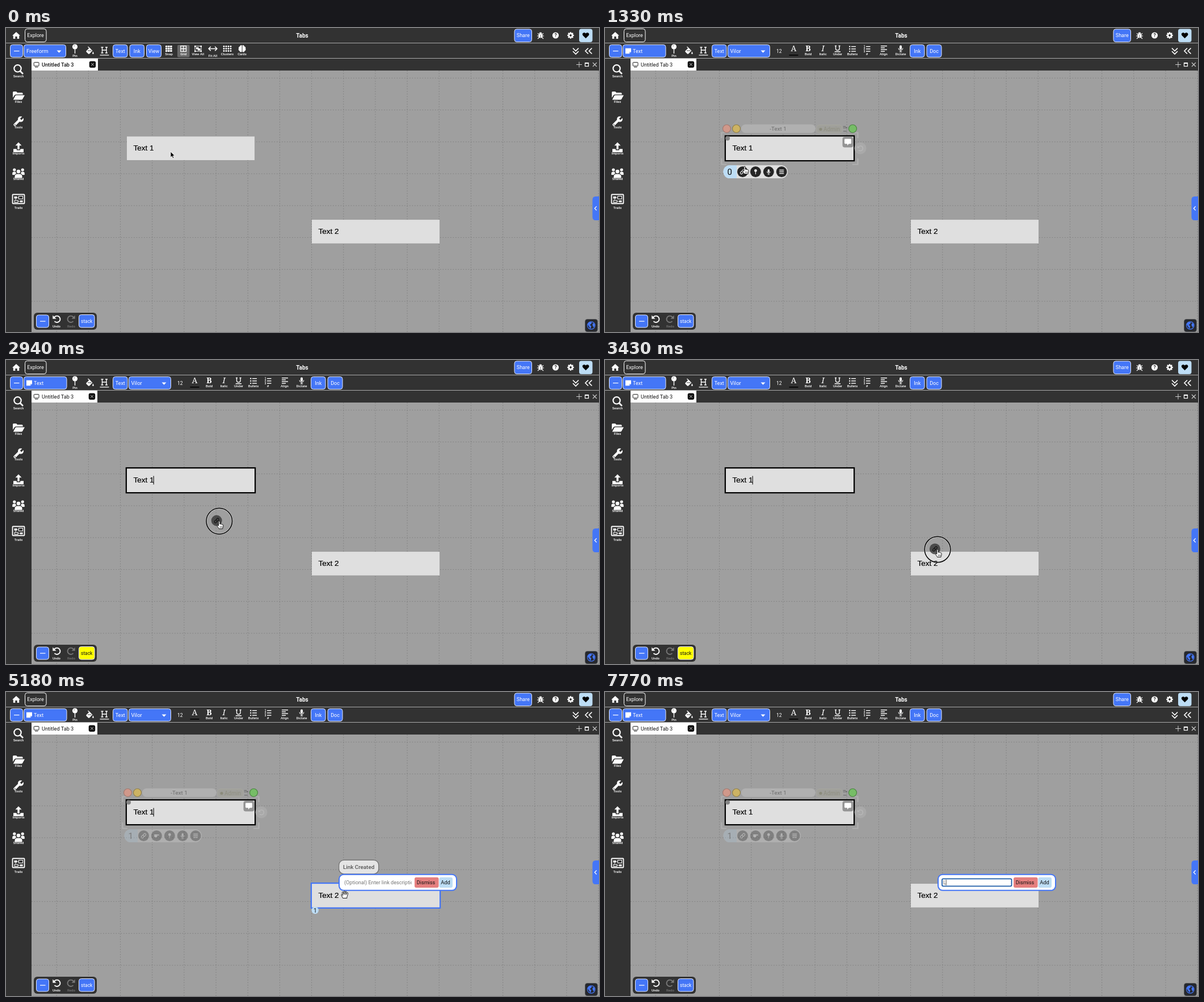
An HTML page for the animation above (8000 ms loop, 1045 px wide and 536 px high).

```html
<!DOCTYPE html>
<html lang="en">
<head>
<meta charset="utf-8">
<title>Tabs</title>
<style>
html, body { margin: 0; width: 100%; height: 100%; overflow: hidden; background: #323232; }
svg { display: block; width: 100%; height: 100%; font-family: Roboto, sans-serif; }
.doc { font-family: "Liberation Sans", sans-serif; stroke: #000; stroke-width: .2; }
</style>
</head>
<body>
<svg id="stage" viewBox="0 0 1045 536"></svg>
<script>
const BLUE = '#4476f7', PALE = '#bdddf5', DARK = '#323232', MID = '#9f9f9f', LIGHT = '#dfdfdf';
const LOOP = 8000, STEP = 70;

// Markup helpers; text y is the middle of the line
const rect = (x, y, w, h, fill, r = 0, more = '') =>
  `<rect x="${x}" y="${y}" width="${w}" height="${h}" rx="${r}" fill="${fill}" ${more}/>`;
const circle = (x, y, r, fill, more = '') => `<circle cx="${x}" cy="${y}" r="${r}" fill="${fill}" ${more}/>`;
const fillPath = (d, fill = '#fff', more = '') => `<path d="${d}" fill="${fill}" ${more}/>`;
const line = (d, color = '#fff', w = 1.5, more = '') =>
  `<path d="${d}" fill="none" stroke="${color}" stroke-width="${w}" ${more}/>`;
const text = (x, y, s, size, fill = '#fff', more = '') =>
  `<text x="${x}" y="${y + size * 0.355}" font-size="${size}" fill="${fill}" ${more}>${s}</text>`;
const MIDDLE = 'text-anchor="middle"', ROUND = 'stroke-linecap="round" stroke-linejoin="round"';
const mid = (x, y, s, size, fill, weight = 400) => text(x, y, s, size, fill, `${MIDDLE} font-weight="${weight}"`);
const label = (x, y, s, fill = '#fff') => mid(x, y, s, 6, fill, 500);
const group = (id, body, more = '') => `<g id="${id}" ${more}>${body}</g>`;
const move = (x, y, body, scale = 1) => `<g transform="translate(${x} ${y}) scale(${scale})">${body}</g>`;
const button = (x, y, w, h, s = '', size = 9) =>
  rect(x + .5, y + .5, w - 1, h - 1, BLUE, 4, 'stroke="#e4e9fb"') + (s && mid(x + w / 2, y + h / 2, s, size));
const minus = (x, y) => button(x, y, 23, 23) + rect(x + 7, y + 11, 9.5, 1.2, '#fff');
const range = (n, f) => Array.from({ length: n }, (_, i) => f(i)).join('');

// Small glyphs centred on the origin
const linkGlyph = color => `<g transform="rotate(-45)">` +
  line('M-.3 1.9H-3A1.9 1.9 0 0 1-3-1.9H-1.2A1.9 1.9 0 0 1 .6 0M.3-1.9H3A1.9 1.9 0 0 1 3 1.9H1.2A1.9 1.9 0 0 1-.6 0', color, 1.1) + '</g>';
const pinGlyph = color => circle(0, -2, 2.4, color) + line('M0 0V4.6', color, 1.1);
const micGlyph = color => rect(-1.6, -4.6, 3.2, 6, color, 1.6) +
  line('M-3-.5A3 3 0 0 0 3-.5M0 2.5V4.5M-1.8 4.6H1.8', color, .9);
const barsGlyph = color => line('M-4-3H4M-4 0H4M-4 3H4', color, 1.3);
const pointGlyph = color => rect(-4.5, -2.2, 9, 1.8, color, .9) + rect(-4, -2.2, 5, 5, color, 1.2);
const undoGlyph = color => line('M-5.3-1.2A5.7 5.7 0 1 1-4 4.2', color, 1.9) + fillPath('M-7.2-6.5V-.2H-1Z', color);

function chrome() {
  const side = [['Search', 85], ['Files', 129.5], ['Tools', 174.5], ['Imports', 220.5], ['Shared', 265.5], ['Trails', 317]];
  return rect(0, 0, 1045, 536, DARK) +
    rect(0, 26, 1045, 1, '#aaa') + rect(0, 53, 1045, 1, '#aaa') +
    fillPath('M11 13.6 18 7l7 6.6h-1.8V19h-3.5v-4h-3.4v4h-3.5v-5.4z') +
    rect(33.5, 1.5, 37.5, 23, 'none', 4, 'stroke="#fff"') + mid(52, 13, 'Explore', 9) +
    mid(522, 13, 'Tabs', 10, '#fff', 700) + button(895.5, 1.5, 31.5, 23.5, 'Share') +
    circle(942, 14, 3.6, '#fff') + circle(942, 9.8, 2.3, '#fff') +
    line('M936 14H948M937 9.5 940 12M947 9.5 944 12M937 19 940 16M947 19 944 16', '#fff', 1.1) + line('M942 12V18', DARK, .7) +
    circle(968.5, 13, 5.6, '#fff') + mid(968.5, 13.2, '?', 8.5, DARK, 700) +
    circle(995, 13, 3.2, 'none', 'stroke="#fff" stroke-width="2.6"') +
    range(8, i => `<rect x="993.8" y="7.2" width="2.4" height="3" fill="#fff" transform="rotate(${i * 45} 995 13)"/>`) +
    rect(1010, 1.5, 23.5, 23.5, PALE, 4) +
    fillPath('M1021.7 18.2 1016.9 13.4C1013.7 9.7 1018.8 6 1021.7 9.7 1024.6 6 1029.7 9.7 1026.5 13.4Z', '#000') +
    line('M999 35.5 1004 40.5 1009 35.5M999 41 1004 46 1009 41M1026 35.5 1021 40.5 1026 45.5M1032.5 35.5 1027.5 40.5 1032.5 45.5', '#fff', 1.7) +
    line('M1005 64.5H1015M1010 59.5V69.5', '#ccc', 1) + line('M1034 61 1041 68M1041 61 1034 68', '#ccc', 1.1) +
    rect(1020.5, 61.5, 6, 6, 'none', 0, 'stroke="#fff" stroke-width="1.2"') + rect(1020, 61, 7, 2, '#fff') +
    side.map(([s, y]) => label(22, y, s)).join('') +
    circle(20.5, 71.3, 6.2, 'none', 'stroke="#fff" stroke-width="2.2"') + line('M25 76 30 81', '#fff', 2.6) +
    fillPath('M12 123V113.5Q12 112 13.5 112H18l2 2h8q1.6 0 1.6 2v1.2H17.5q-2 0-3 2ZM12.8 126.5 16.3 119.8q.6-1.2 2-1.2H33L29.2 125.2q-.7 1.3-2 1.3Z') +
    line('M15.5 170.5 23.5 162.5', '#fff', 4.4, ROUND) + circle(26, 160.8, 5, '#fff') +
    line('M26 161 31 156', DARK, 3.4) + circle(15.8, 170.3, .9, DARK) +
    fillPath('M22 201.5 27.5 207.3H23.7V214H20.3V207.3H16.5Z') +
    fillPath('M13 213.3H18.8V215.5H25.2V213.3H31V219H13Z') +
    circle(22, 253, 3.3, '#fff') + circle(14.8, 250, 2.6, '#fff') + circle(29.2, 250, 2.6, '#fff') +
    fillPath('M15.5 264.5V262Q15.5 257.5 20 257.5H24Q28.5 257.5 28.5 262V264.5ZM11.3 258V256Q11.3 253.4 14 253.4H16.8Q17.6 256 18.4 256.6 16 257 15.4 259H11.3ZM32.7 258V256Q32.7 253.4 30 253.4H27.2Q26.4 256 25.6 256.6 28 257 28.6 259H32.7Z') +
    rect(11.5, 293.5, 21, 16, 'none', 1, 'stroke="#fff" stroke-width="1.8"') +
    rect(14.5, 297, 5, 3.6, '#fff') + rect(22.5, 296.5, 7, 5, 'none', 0, 'stroke="#fff"') +
    rect(15, 304, 6, 3.4, 'none', 0, 'stroke="#fff"') + rect(25, 304, 4.5, 3.2, '#fff') +
    line('M19 299H23M17 300V304M21 305.5H25', '#fff', .8);
}

function tools() {
  const heading = line('M169.5 34V44M177 34V44M169.5 39H177M167.5 34H171.5M175 34H179M167.5 44H171.5M175 44H179', '#fff', 1.4);
  const shared = minus(7, 29) + circle(121.5, 33, 4.6, '#fff') + circle(120.3, 31.6, 1, '#999') + line('M121.5 37V45', '#fff', 1.4) +
    label(121.5, 49, 'Pin') +
    fillPath('M142 40 147.2 34.8 152.4 40 147 45.5Q146 46.3 145 45.5L141.5 42Q140.8 41 142 40ZM153.4 41.5Q156 46 153.4 46 151 46 153.4 41.5Z') +
    line('M144.5 33 149 37.5', '#fff', 1.2) + line('M144 40H150.6', DARK, 1) +
    heading + rect(165.5, 47, 16, 1.5, '#ddd');
  const freeform = button(31, 29, 75, 23) + text(36, 41, 'Freeform', 9.5) + fillPath('M89.5 39.5H97.5L93.5 43.7Z') +
    button(188, 29, 26.5, 23, 'Text') + button(217.5, 29, 26.5, 23, 'Ink') + button(247, 29, 27, 23, 'View') +
    range(9, i => rect(281 + i % 3 * 4.1, 31 + Math.floor(i / 3) * 3.9, 3.4, 3.2, '#fff', .4)) + label(287, 46, 'Snap') +
    rect(302, 30, 21.5, 21.5, '#686868', 2) +
    line('M307.8 31.7H317.5V41.3H307.8ZM312.6 31.7V41.3M307.8 36.5H317.5', '#fff', 1.3) + label(312.7, 46, 'Grid') +
    rect(333, 32, 11, 9, 'none', 0, 'stroke="#fff"') + rect(335, 34, 4.5, 3.6, '#fff') + rect(338, 36, 4.5, 3.6, '#fff') +
    [332, 342.5].map(x => rect(x, 31, 2.5, 2.5, '#fff') + rect(x, 39.7, 2.5, 2.5, '#fff')).join('') + label(338.3, 46, 'View All') +
    line('M358 36.5H371M360.8 32.8 357.2 36.5 360.8 40.2M368.2 32.8 371.8 36.5 368.2 40.2', '#fff', 1.6) + label(364.5, 48.5, 'Fit All') +
    range(12, i => circle(384 + i % 4 * 4, 32.5 + Math.floor(i / 4) * 4, 1.45, '#fff')) + label(390, 46, 'Clusters') +
    fillPath('M415.6 30.5V42Q412.5 43.5 411.6 40.5 409 39.5 410 36 409.5 33 412 32.5 413 29.7 415.6 30.5ZM416.6 30.5V42Q419.7 43.5 420.6 40.5 423.2 39.5 422.2 36 422.7 33 420.2 32.5 419.2 29.7 416.6 30.5Z') +
    label(416, 46, 'Cards');
  const rows = (x, w) => [32, 36.2, 40.4].map(y => rect(x, y, w, 1.4, '#fff')).join('');
  const glyph = (x, s, more) => text(x, 36.3, s, 14, '#fff', `${MIDDLE} font-family="Noto Serif, serif" ${more}`);
  const writing = button(31, 29, 76.5, 23) + fillPath('M36 35.7H46V42L42.7 45.3H36Z') + fillPath('M46 42H42.7V45.3Z', '#a9bdf8') +
    text(49, 40.5, 'Text', 9) + button(188, 29, 26.5, 23, 'Text') +
    button(216, 29, 75, 23) + text(220.5, 41, 'Vilor', 9.5) + fillPath('M274.5 39.5H282.5L278.5 43.7Z') +
    mid(306.7, 40.5, '12', 8.5) + glyph(332.5, 'A', '') + rect(324.5, 47, 16, 1.6, '#000') +
    glyph(358, 'B', 'font-weight="700"') + label(358, 46, 'Bold') + glyph(384, 'I', 'font-style="italic"') + label(384, 46, 'Italic') +
    line('M406.5 31.5V36A3.3 3.3 0 0 0 413.1 36V31.5M405 31.5H408M411.6 31.5H414.6M404.7 41.8H415', '#fff', 1.4) + label(410, 46, 'Under') +
    [32.7, 36.9, 41.1].map(y => circle(431.2, y, 1.2, '#fff')).join('') + rows(434, 8) + label(436, 46, 'Bullets') +
    ['1', '2', '3'].map((s, i) => mid(457, 32.7 + i * 4.2, s, 4.5, '#fff', 700)).join('') + rows(460, 7.5) + label(461.5, 46, '#') +
    [11, 7, 11, 7].map((w, i) => rect(486, 31 + i * 3.2, w, 1.4, '#fff')).join('') + label(491, 46, 'Align') +
    move(521, 36.2, micGlyph('#fff'), 1.25) + label(521, 46, 'Dictate') +
    button(537, 29, 26.5, 23, 'Ink') + button(566.5, 29, 27, 23, 'Doc');
  return shared + group('freeform', freeform) + group('writing', writing);
}

// A text card is 200 by 37 units at a zoom of 1.125, its outline 2 units wide
const card = (x, y, s) => rect(x, y, 225, 41.7, LIGHT) + text(x + 11.4, y + 20.2, s, 13.6, '#000', 'class="doc"');
const outline = (x, y, color, id) =>
  rect(x - 1.1, y - 1.1, 227.2, 43.9, 'none', 0, `id="${id}" stroke="${color}" stroke-width="2.25"`);

function canvas() {
  const dash = 'stroke-dasharray="1.7 2.8"';
  const tab = (id, w, weight) => group(id, rect(45, 54, w, 21, '#fff') +
    text(63, 64.3, 'Untitled Tab 3', 9.2, '#111', `font-weight="${weight}"`) +
    rect(w + 29.7, 58.5, 11.5, 11.5, '#111', 3) + line(`M${w + 33.2} 62l4.6 4.6m0-4.6-4.6 4.6`, '#ddd', .9));
  return rect(45, 75, 1000, 461, MID) + tab('tabBold', 117, 500) + tab('tabPlain', 116, 400) +
    rect(49.2, 60.5, 8.8, 6.5, 'none', 1, 'stroke="#222"') + line('M51 69H56.5', '#222', 1) +
    range(18, i => line(`M${89.2 + i * 56.17} 75V536`, '#7d7d7d', .9, dash)) +
    range(8, i => line(`M45 ${88.3 + i * 56.22}H1045`, '#7d7d7d', .9, dash)) +
    card(213, 191.3, 'Text 1') + card(539, 338.1, 'Text 2') +
    outline(213, 191.3, BLUE, 'hover1') + outline(213, 191.3, '#000', 'picked') +
    rect(259.6, 204.5, 1.1, 15, '#000', 0, 'id="caret1"') +
    group('hover2', outline(539, 338.1, BLUE, 'edge2') + circle(544.7, 385, 6.2, PALE) + mid(544.7, 385, '1', 10, '#111'));
}

function decor() {
  const knob = (x, fill, edge) => circle(x, 177.5, 7, fill, `stroke="${edge}" stroke-width="1.2"`);
  const bar = (id, count, glyphs) => group(id,
    rect(208.5, 242, 22 + glyphs.length * 22.9, 23, LIGHT, 11.5) +
    fillPath('M232 242H220A11.5 11.5 0 0 0 220 265H232Z', PALE) + mid(219.8, 253.7, count, 15, '#111') +
    glyphs.map((g, i) => circle(242.5 + i * 22.9, 253.5, 9.4, '#252525') + move(242.5 + i * 22.9, 253.5, g('#eee'))).join(''));
  return group('decor',
    line('M205.5 194V184.5H213M438 184.5H445.5V194M205.5 230V240.5H214M436 240.5H445.5V230', '#b0b0b0', 2.2) +
    knob(214.5, '#d0988a', '#a17a71') + knob(231.5, '#cdb363', '#90804e') + knob(436.5, '#76bd66', '#4d8443') +
    rect(240, 170, 131, 15, '#b0b0b0', 7.5) + mid(305, 177.3, '-Text 1', 9.8, '#6c6c6c') +
    rect(373, 171, 45, 14, '#9f9f9a', 5, 'stroke="#a9a99f"') + circle(380, 178.5, 2.6, '#8b8b7c') + mid(399.5, 178.5, 'Admin', 10, '#8f8f80') +
    line('M419.5 173.5H424M419.5 176H427M420 182H426M424 174.5 427 177', '#666', 1) +
    circle(216, 194.5, 4, '#858585') +
    rect(418.5, 192, 19, 18.5, '#949494', 4) + fillPath('M423.3 195.5H432.7Q434 195.5 434 196.9V202.8Q434 204.2 432.7 204.2H429.5L427 207.2V204.2H423.3Q422 204.2 422 202.8V196.9Q422 195.5 423.3 195.5Z') +
    circle(450, 212, 10.5, '#a9a9a9') + move(450, 212, undoGlyph('#b8b8b8'), .75) +
    group('bars', bar('bar0', '0', [linkGlyph, pinGlyph, micGlyph, barsGlyph]) +
      bar('bar1', '1', [linkGlyph, pointGlyph, pinGlyph, micGlyph, barsGlyph])));
}

function overlays() {
  const stack = (id, fill, ink) => group(id, rect(128.5, 505.5, 27.5, 22.5, fill, 4, 'stroke="#eef"') + mid(142.2, 517, 'stack', 8.4, ink));
  return rect(49, 502, 111, 30, DARK, 6) + minus(53, 505.5) +
    move(89.5, 513, undoGlyph('#fff')) + label(89, 526, 'Undo') +
    `<g transform="translate(114.5 513) scale(-1 1)">${undoGlyph('#777')}</g>` + label(115, 526, 'Redo', '#777') +
    stack('stackIdle', BLUE, '#fff') + stack('stackBusy', '#ff0', '#111') +
    fillPath('M1045 297H1039Q1033.5 297 1033.5 303V333Q1033.5 339 1039 339H1045Z', BLUE) + line('M1040.7 314.5 1037.3 318 1040.7 321.5', '#fff', 1.2) +
    rect(1020.5, 513.5, 22, 22, '#26282e', 4, 'stroke="#555" stroke-width=".6"') +
    circle(1031.3, 524.5, 6.7, '#26282e', `stroke="${BLUE}" stroke-width="1.2"`) +
    fillPath('M1025 522.5Q1026.5 518.6 1030 518L1032.5 519.5 1031 522 1028.5 523.5 1031.5 525.5 1030 530.5 1027.5 526.5ZM1034 520.5 1036.8 521.5 1037.6 525 1035.5 528 1033.5 524Z', BLUE) +
    group('note', rect(586.7, 296.3, 70, 24.6, '#e4e4e4', 9, 'stroke="#6e6e6e" stroke-width="1.2"') + mid(621.6, 308.5, 'Link Created', 9.8, '#555', 500)) +
    group('form', rect(587, 321.8, 207, 28, '#fff', 8, `stroke="${BLUE}" stroke-width="2"`) +
      `<clipPath id="field"><path d="M594 326H715V346H594Z"/></clipPath>` +
      group('hint', text(596, 335.6, '(Optional) Enter link description', 9.1, '#757575'), 'clip-path="url(#field)"') +
      rect(594, 329.3, 122.5, 13, 'none', 2, 'id="focus" stroke="#1d5ca8" stroke-width="1.8"') +
      group('typed', text(596, 335.6, 'L', 9.1, '#666')) + rect(0, 330.8, .9, 10, '#333', 0, 'id="caret2"') +
      rect(720, 326.7, 42.5, 18.3, '#e57f7f', 3) + mid(740, 335.6, 'Dismiss', 9.1, '#111') +
      rect(763.5, 326.7, 23.5, 18.3, PALE, 3) + mid(774.5, 335.6, 'Add', 9.3, '#111')) +
    group('tip', rect(191.7, 274.3, 101.3, 21.5, '#696969', 3) + mid(242.2, 285, 'Drag or tap to start link', 8.3, '#fff', 700)) +
    group('hints', rect(220, 231.3, 45.5, 16.5, '#000') +
      circle(229.5, 238.5, 4.8, 'none', 'stroke="#fff" stroke-width="1.8"') + line('M233 242 237 246M226 242 233 235', '#fff', 1.8) +
      fillPath('M248 245V240.5L250 239 251.5 235.5Q252 234.5 253 234.5H255.5Q256.5 234.5 257 235.5L258.5 239 260.5 240.5V245H258.5V246.5H256.5V245H252V246.5H250V245Z') +
      line('M251.5 239 252.6 236H256L257.2 239Z', '#000', .9) + circle(242.5, 253.5, 9.4, '#111') + move(242.5, 253.5, linkGlyph('#fff')));
}

function pointers() {
  const edge = 'stroke="#000" stroke-width=".9" stroke-linejoin="round"';
  return group('mouse',
    group('ghost', circle(-4.6, -1, 9.5, '#2d2d2d', 'opacity=".75"') + move(-4.6, -1, linkGlyph('#111'))) +
    group('ring', circle(0, 0, 22.6, 'none', 'stroke="#fff" stroke-opacity=".35" stroke-width="3"') + circle(0, 0, 22.8, 'none', 'stroke="#000" stroke-width="1.5"')) +
    group('arrow', fillPath('M0 0V10.2L2.4 8 4 11.6 5.8 10.8 4.2 7.3H7.4Z', '#000', 'stroke="#fff" stroke-width=".8"')) +
    group('finger', fillPath('M-1.2 1.2C-1.2-.6 1.2-.6 1.2 1.2V5.2C1.6 4.6 3.2 4.8 3.3 5.7 3.8 5 5.2 5.3 5.3 6.3 6 5.8 7 6.2 7 7.2V9.5C7 11 6 11.5 6 13.5H-.5C-.8 12-2.5 10.5-3.4 8.8-4.2 7.5-2.7 6.8-1.2 8.2Z', '#fff', edge) +
      line('M1.5 9V12M3.4 9V12M5.2 9V12', '#000', .6)) +
    group('palm', fillPath('M-3.5 6.5C-4 5-5.5 3-6 1.2-6.3 0-4.8-.4-4 1L-4.6-3.4C-4.8-5-3-5.2-2.7-3.8L-2-1-1.7-5C-1.6-6.6.3-6.6.4-5V-1L1.2-4.6C1.5-6 3.3-5.6 3.1-4.2L2.7-.5 3.8-2.8C4.5-4 6-3.2 5.6-1.8 5 .6 4.6 3 3.8 4.4V6.5Z', '#fff', edge) +
      line('M-4 1-3.2 2.6M-2-1-1.8.6M.4-1V.6M2.7-.5 2.4.8', '#000', .8)) +
    group('beam', line('M-2.5-6Q0-6 0-4.5Q0-6 2.5-6M0-5V5M-2.5 6Q0 6 0 4.5Q0 6 2.5 6M-1.5 1.5H1.5', '#111', 1)));
}

const stage = document.getElementById('stage');
stage.innerHTML = chrome() + tools() + canvas() + decor() + overlays() + pointers();
const parts = {};
stage.querySelectorAll('[id]').forEach(e => parts[e.id] = e);
const show = (id, on) => { parts[id].style.display = on ? '' : 'none'; };
const fade = (id, v) => { parts[id].style.opacity = v; };
const clamp = v => Math.max(0, Math.min(1, v));

// Pointer stops: time, x, y
const PATH = [[910, 290, 218], [1330, 246, 244], [1680, 246, 254], [2170, 246, 254], [2590, 249, 254], [3430, 586, 334],
  [3780, 586, 350], [4130, 586, 350], [4760, 597, 357], [5180, 597, 357], [5390, 598, 350], [5530, 598, 350], [5950, 647, 335]];

function pointerAt(t) {
  const i = PATH.findIndex(p => p[0] > t);
  if (i < 0) return PATH[PATH.length - 1].slice(1);
  if (!i) return PATH[0].slice(1);
  const a = PATH[i - 1], b = PATH[i], k = (t - a[0]) / (b[0] - a[0]), e = k * k * (3 - 2 * k);
  return [a[1] + (b[1] - a[1]) * e, a[2] + (b[2] - a[2]) * e];
}

function draw(t) {
  const within = (a, b) => t >= a && t < b;
  const picked = t >= 490, linked = t >= 4200, drag = within(2660, 4200);
  show('freeform', !picked);
  show('writing', picked);
  show('tabBold', t < 980);
  show('tabPlain', t >= 980);
  show('hover1', !picked);
  fade('hover1', clamp(t / 280));
  show('picked', picked);
  show('caret1', within(630, 1120) || within(1610, 2100) || within(2660, 4690) || within(5180, 5600) || within(6090, 6160));
  show('hover2', within(4270, 5320));
  show('decor', within(630, 2660) || t >= 4340);
  fade('bars', within(1190, 2660) ? 1 : .25);
  show('bar0', !linked);
  show('bar1', linked);
  show('stackIdle', !drag);
  show('stackBusy', drag);
  show('tip', within(1680, 2660));
  show('hints', within(2100, 2660));
  show('form', t >= 4340);
  show('note', within(4340, 7000));
  fade('note', clamp((7000 - t) / 210));
  show('focus', t >= 6160);
  show('hint', t < 7700);
  show('typed', t >= 7700);
  show('caret2', within(6160, 6650) || t >= 7140);
  parts.caret2.setAttribute('x', t < 7700 ? 595.8 : 600.6);
  show('ghost', drag);
  show('ring', within(2100, 4200));
  fade('ring', t < 2170 ? .6 : 1);
  show('arrow', t < 1190);
  show('finger', within(1190, 4200));
  show('palm', within(4200, 5670));
  show('beam', within(5670, 7700));
  parts.mouse.setAttribute('transform', `translate(${pointerAt(t).join(' ')})`);
}

const start = performance.now();
function tick() {
  const t = (performance.now() - start) % LOOP;
  draw(Math.floor(t / STEP) * STEP);
  requestAnimationFrame(tick);
}
tick();
</script>
</body>
</html>
```
